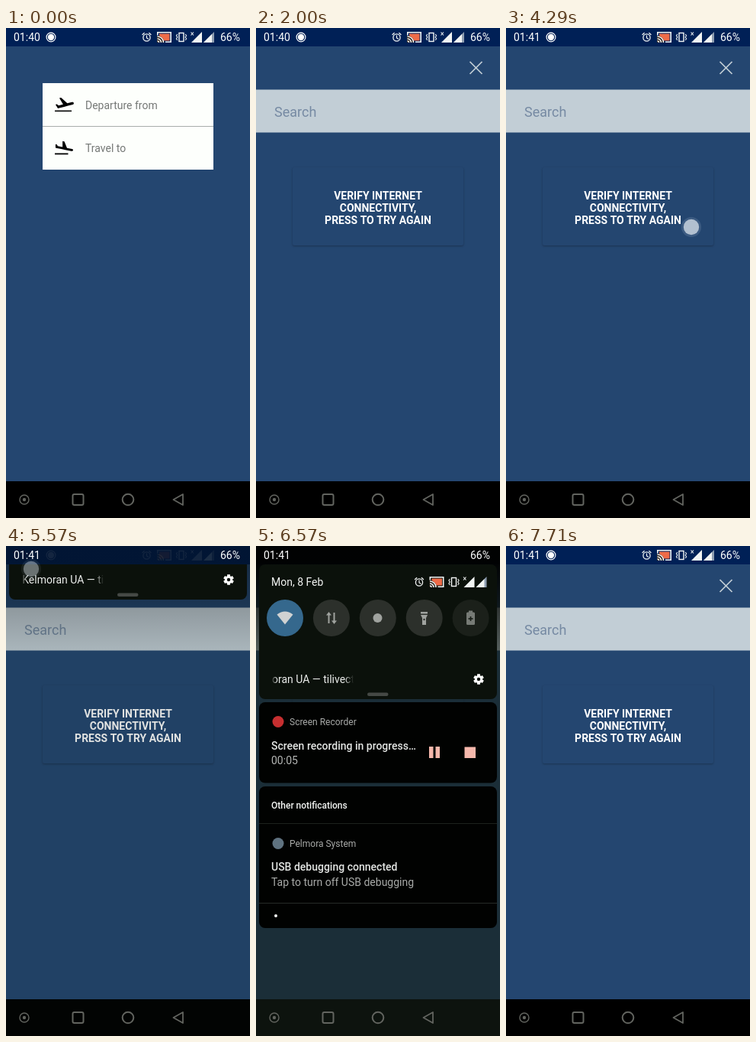
An HTML page with a canvas that plays this animation: 320x640 px, repeating every 8000 ms.

```html
<!DOCTYPE html>
<html lang="en">
<head>
<meta charset="utf-8">
<title>Travel search</title>
<style>
html, body { margin: 0; width: 100%; height: 100%; overflow: hidden; background: #000; }
canvas { display: block; width: 100%; height: 100%; }
</style>
</head>
<body>
<canvas id="stage" width="320" height="640"></canvas>
<script>
const ctx = document.getElementById('stage').getContext('2d');
const LOOP = 8000, RATE = 7;
const BLUE = '#244670', PANEL = '#0b110b';
const FULL = 499, QS_BOTTOM = 200;

const clamp = (v, a = 0, b = 1) => Math.min(b, Math.max(a, v));
const lerp = (a, b, k) => a + (b - a) * k;
const ease = k => k * k * (3 - 2 * k);
const mix = (a, b, k) => `rgb(${a.map((v, n) => Math.round(lerp(v, b[n], k)))})`;

// Piecewise linear value from [position, value] pairs
function track(keys, p) {
  if (p <= keys[0][0]) return keys[0][1];
  for (let n = 1; n < keys.length; n++) {
    const [a, va] = keys[n - 1], [b, vb] = keys[n];
    if (p <= b) return lerp(va, vb, (p - a) / (b - a));
  }
  return keys[keys.length - 1][1];
}

function rect(x, y, w, h, color) {
  ctx.fillStyle = color;
  ctx.fillRect(x, y, w, h);
}
function round(x, y, w, h, r, color) {
  ctx.fillStyle = color;
  ctx.beginPath();
  ctx.roundRect(x, y, w, h, r);
  ctx.fill();
}
function disc(x, y, r, color) {
  ctx.fillStyle = color;
  ctx.beginPath();
  ctx.arc(x, y, r, 0, 7);
  ctx.fill();
}
function ring(x, y, r, color, width) {
  ctx.strokeStyle = color;
  ctx.lineWidth = width;
  ctx.beginPath();
  ctx.arc(x, y, r, 0, 7);
  ctx.stroke();
}
function trace(points) {
  ctx.beginPath();
  for (let n = 0; n < points.length; n += 2) ctx.lineTo(points[n], points[n + 1]);
}
function poly(points, color) {
  trace(points);
  ctx.closePath();
  ctx.fillStyle = color;
  ctx.fill();
}
function line(points, color, width) {
  trace(points);
  ctx.strokeStyle = color;
  ctx.lineWidth = width;
  ctx.stroke();
}
function text(str, x, y, size, color, weight = 400, align = 'left') {
  ctx.font = `${weight} ${size}px Roboto, sans-serif`;
  ctx.textAlign = align;
  ctx.fillStyle = color;
  ctx.fillText(str, x, y);
}
function scoped(draw, alpha = 1, dx = 0, dy = 0) {
  if (alpha <= 0) return;
  ctx.save();
  ctx.globalAlpha *= alpha;
  ctx.translate(dx, dy);
  draw();
  ctx.restore();
}
function clip(x, y, w, h) {
  ctx.beginPath();
  ctx.rect(x, y, w, h);
  ctx.clip();
}

const TAKEOFF = new Path2D('M22.07 9.64c-.21-.8-1.04-1.28-1.84-1.06L14.92 10l-6.9-6.43-1.93.51 4.14 7.17-4.97 1.33-1.97-1.54-1.45.39 1.82 3.16.77 1.33 1.6-.43 5.31-1.42 4.35-1.16L21 11.49c.81-.23 1.28-1.05 1.07-1.85z');
const LANDING = new Path2D('M9.68 13.27l4.35 1.16 5.31 1.42c.8.21 1.62-.26 1.84-1.06.21-.8-.26-1.62-1.06-1.84l-5.31-1.42-2.76-9.02L10.12 2v8.28L5.15 8.95l-.93-2.32-1.45-.39v5.17l1.6.43 5.31 1.43z');

function plane(path, x, y, sx, sy) {
  ctx.save();
  ctx.translate(x, y);
  ctx.scale(sx, sy);
  ctx.fillStyle = '#000';
  ctx.fill(path);
  ctx.restore();
}

function statusIcons() {
  const c = '#f2f4f4';
  ring(184.5, 12.5, 4.6, c, 1.3);
  line([184.5, 9.5, 184.5, 13, 187, 14.5], c, 1.2);
  line([178.6, 9, 181.6, 6.3], c, 1.3);
  line([187.4, 6.3, 190.4, 9], c, 1.3);

  rect(201, 7.5, 13.5, 9, '#ee6b48');
  line([198.8, 9.5, 198.8, 5.8, 216.2, 5.8, 216.2, 18.2, 209, 18.2], c, 1.6);
  poly([198, 10, 202, 10.5, 206, 14, 208, 19, 198, 19], '#33281f');
  for (const r of [2, 5, 8]) {
    ctx.beginPath();
    ctx.arc(198.5, 19, r, -Math.PI / 2, 0);
    ctx.strokeStyle = c;
    ctx.lineWidth = 1.5;
    ctx.stroke();
  }

  ctx.strokeStyle = c;
  ctx.lineWidth = 1.4;
  ctx.strokeRect(227, 6.5, 6, 11);
  line([224.8, 8, 223.4, 10, 224.8, 12, 223.4, 14, 224.8, 16], c, 1.1);
  line([235.2, 8, 236.6, 10, 235.2, 12, 236.6, 14, 235.2, 16], c, 1.1);

  poly([257, 5, 257, 19, 243, 19], c);
  line([242.5, 5.5, 246, 9.5], c, 1.1);
  line([246, 5.5, 242.5, 9.5], c, 1.1);
  poly([273, 5, 273, 19, 259, 19], '#8d9cb0');
  poly([270, 8, 270, 19, 259, 19], c);
}

function navIcons() {
  const c = '#62645f';
  ring(24, 616, 6, c, 1.4);
  disc(24, 616, 2.2, c);
  ctx.strokeStyle = c;
  ctx.lineWidth = 2;
  ctx.beginPath();
  ctx.roundRect(87.5, 609, 14, 14, 2);
  ctx.stroke();
  ring(160, 616, 7.3, c, 2);
  ctx.lineJoin = 'round';
  line([232, 609, 232, 623, 219.5, 616, 232, 609, 232, 612], c, 1.8);
  ctx.lineJoin = 'miter';
}

function formPage(fade) {
  scoped(() => {
    rect(48, 129, 224, 56, '#fdfffc');
    plane(LANDING, 61.5, 146, 1.25, 0.93);
    rect(64, 163.5, 17.5, 1.8, '#000');
    text('Travel to', 104, 162, 14, '#757876');
    rect(48, 128, 224, 1, '#a9aeac');
  }, fade);
}

function searchBar(open) {
  const x = lerp(48, 0, open);
  rect(x, lerp(72, 80.5, open), 320 - 2 * x, 56, mix([253, 255, 252], [194, 206, 214], open));
  scoped(() => {
    plane(TAKEOFF, 62.8, 87, 1.18, 1.13);
    rect(64, 107.6, 22, 1.6, '#000');
    text('Departure from', 104, 105.5, 14, '#757876');
  }, 1 - 2 * open);
  scoped(() => {
    text('Search', 24, 115.5, 18, '#768aa3');
    line([280.5, 44, 296.5, 60], '#c3ced6', 1.7);
    line([296.5, 44, 280.5, 60], '#c3ced6', 1.7);
  }, 2 * open - 1);
}

function retryButton() {
  ctx.shadowColor = 'rgba(0,0,0,.28)';
  ctx.shadowBlur = 2.5;
  ctx.shadowOffsetY = 1;
  round(48, 182, 224, 102, 2, BLUE);
  ctx.shadowColor = 'transparent';
  ['VERIFY INTERNET', 'CONNECTIVITY,', 'PRESS TO TRY AGAIN'].forEach((s, n) =>
    text(s, 160, 223.6 + n * 16.3, 14, '#fff', 700, 'center'));
}

function wifi(x, y, color) {
  ctx.fillStyle = color;
  ctx.beginPath();
  ctx.moveTo(x, y + 8.5);
  ctx.lineTo(x - 10.5, y - 4.5);
  ctx.quadraticCurveTo(x, y - 12.5, x + 10.5, y - 4.5);
  ctx.fill();
}

function arrow(x, y, dir, color) {
  line([x, y - 7 * dir, x, y + 4 * dir], color, 2);
  poly([x - 3.5, y + 3.5 * dir, x + 3.5, y + 3.5 * dir, x, y + 8 * dir], color);
}

function gear(x, y) {
  for (let n = 0; n < 6; n++) {
    const a = n * Math.PI / 3 + Math.PI / 6;
    line([x, y, x + 6.8 * Math.cos(a), y + 6.8 * Math.sin(a)], '#fff', 3.8);
  }
  disc(x, y, 5.2, '#fff');
  disc(x, y, 2.2, PANEL);
}

function carrier(ms) {
  const first = 'Kelmoran ';
  const anchor = 75 - 0.032 * (ms - 5860);
  ctx.save();
  clip(20, 160, 108, 26);
  ctx.font = '400 14px Roboto, sans-serif';
  text(first + 'UA — tilivect', anchor - ctx.measureText(first).width, 179, 14, '#eceeec');
  for (const [edge, inner] of [[20, 28], [128, 116]]) {
    const g = ctx.createLinearGradient(edge, 0, inner, 0);
    g.addColorStop(0, PANEL);
    g.addColorStop(1, 'rgba(11,17,11,0)');
    rect(Math.min(edge, inner), 160, Math.abs(edge - inner), 26, g);
  }
  ctx.restore();
}

function quickSettings(on, ms) {
  round(4, 24, 312, QS_BOTTOM - 24, 8, PANEL);
  text('Mon, 8 Feb', 20, 52, 14, '#f2f4f2');
  scoped(statusIcons, 1, 29.5, 35);
  const g = '#a0a39f', y = 94;
  for (let n = 0; n < 5; n++) {
    const off = n === 4 ? '#1b201a' : '#2c302b';
    disc(38 + n * 60.9, y, 24, n ? off : mix([44, 48, 43], [61, 160, 238], on));
  }
  wifi(38, y, mix([165, 168, 164], [250, 252, 255], on));
  arrow(95.5, y, -1, g);
  arrow(102.5, y, 1, g);
  disc(159.5, y, 6, g);
  rect(216, 86, 9, 2.5, g);
  poly([216, 90, 225, 90, 223, 94, 223, 103, 218, 103, 218, 94], g);
  disc(220.5, 96, 1.2, '#2c302b');
  round(276, 86.5, 11, 16.5, 1.5, '#777b76');
  rect(279, 84.5, 5, 3, '#777b76');
  line([278.5, 95, 284.5, 95], '#1b201a', 1.7);
  line([281.5, 92, 281.5, 98], '#1b201a', 1.7);
  carrier(ms);
  gear(292, 174);
  round(146, 191.5, 27.5, 4.5, 2.2, '#454945');
}

const appIcon = (x, y, r = 7.5) => disc(x, y, r, '#c62f30');
const systemIcon = (x, y, r = 7.5) => disc(x, y, r, '#5f7280');

function cards() {
  round(4, 204, 312, 105.5, 8, '#010201');
  appIcon(29, 229.5);
  text('Screen Recorder', 44, 234, 12, '#a9aba9');
  text('Screen recording in progress…', 20, 266, 14, '#e4e6e4', 500);
  text('00:05', 20, 285, 14, '#b4b6b4');
  for (const x of [227, 235.5]) rect(x, 262, 5.5, 15, '#f6b8ac');
  rect(273.5, 262.5, 14.5, 14.5, '#f6b8ac');

  round(4, 314, 312, FULL - 314, 8, '#010201');
  text('Other notifications', 20, 343, 12, '#f4f6f4', 500);
  rect(4, 362, 312, 1, '#1d211d');
  systemIcon(29, 388.5);
  text('Pelmora System', 44, 393, 12, '#a9aba9');
  text('USB debugging connected', 20, 424, 14, '#e4e6e4', 500);
  text('Tap to turn off USB debugging', 20, 443.5, 14, '#a9aba9');
}

function notifications(bottom) {
  const top = Math.max(204, bottom - 33);
  const merged = top > 204;
  ctx.save();
  clip(0, 204, 320, top - 204);
  cards();
  ctx.restore();
  if (merged) rect(4, top, 312, 1, '#262b28');
  const y = merged ? top + 1 : top;
  ctx.save();
  clip(0, y, 320, bottom - y);
  round(4, y, 312, bottom - y, merged ? [0, 0, 8, 8] : 8, '#010201');
  if (!merged) {
    appIcon(28, 219.5, 6.5);
    systemIcon(48.5, 219.5, 6.5);
    disc(69.5, 219.5, 2, '#f0f2f0');
  } else if (top < 380) {
    systemIcon(39, top + 16.5, 7);
    disc(60, top + 16.5, 2, '#f0f2f0');
  } else {
    disc(26, top + 17, 2, '#f0f2f0');
  }
  ctx.restore();
}

const PULL = [[38, 0], [39, 70], [40, 180], [41, 286], [42, 410], [43, FULL], [48, FULL],
  [49, 390], [50, 236], [51, 150], [52, 75], [53, 24], [54, 0]];
const SCRIM = [[0, 0], [236, 0.43], [286, 0.55], [FULL, 0.62]];

function shade(bottom, on, ms) {
  rect(0, 0, 320, 640, `rgba(22,31,24,${track(SCRIM, bottom)})`);
  const k = clamp(bottom / 200);
  const g = ctx.createLinearGradient(0, 20, 0, 140);
  g.addColorStop(0, `rgba(0,0,0,${0.95 * k})`);
  g.addColorStop(1, 'rgba(0,0,0,0)');
  rect(0, 0, 320, 140, g);
  ctx.save();
  clip(0, 24, 320, 616);
  scoped(() => quickSettings(on, ms), 1, 0, Math.min(0, bottom - QS_BOTTOM));
  if (bottom > 206) notifications(bottom);
  ctx.restore();
}

// Touches: first tick, end tick, start x, y, end x, y, strength
const TOUCHES = [
  [1, 3, 150, 102, 150, 102, 0.75],
  [11, 14, 222, 237, 222, 237, 0.75],
  [16, 19, 240, 252, 240, 252, 0.75],
  [21, 23, 245, 262, 245, 262, 0.75],
  [25, 27, 244, 258, 244, 258, 0.75],
  [29, 31, 243, 260, 243, 260, 0.75],
  [32, 33, 248, 257, 248, 257, 0.75],
  [35, 37, 240, 246, 240, 246, 0.75],
  [39, 42, 33, 30, 33, 172.5, 0.42],
  [44, 46, 38, 96, 38, 96, 0.45],
  [48, 51, 248, 564, 254, 372, 0.6]
];

function touch(tick) {
  const hit = TOUCHES.find(([a, b]) => tick >= a && tick < b);
  if (!hit) return;
  const [a, b, x0, y0, x1, y1, alpha] = hit;
  const k = (tick - a) / (b - a);
  const x = lerp(x0, x1, k), y = lerp(y0, y1, k);
  scoped(() => {
    disc(x, y, 13, 'rgba(200,215,235,.2)');
    disc(x, y, 10.2, '#dae2ea');
  }, alpha);
}

function draw(ms) {
  const tick = Math.floor((ms + 5) * RATE / 1000);
  const open = ease(clamp((tick - 2) / 4));
  const pull = track(PULL, tick);

  rect(0, 0, 320, 640, BLUE);
  rect(0, 0, 320, 24, '#002056');
  rect(0, 592, 320, 48, '#000');
  formPage(1 - open);
  searchBar(open);
  scoped(retryButton, clamp((tick - 6) / 2));

  scoped(() => {
    ring(59, 12, 5.9, '#fff', 1.2);
    disc(59, 12, 4.2, '#fff');
    statusIcons();
  }, 1 - clamp(pull / 80));
  if (pull > 0) shade(pull, clamp((tick - 45) / 2), ms);
  text(tick < 25 ? '01:40' : '01:41', 10, 17, 14, '#fff');
  text('66%', 281, 17, 14, '#fff');
  navIcons();
  touch(tick);
}

function loop(now) {
  draw(now % LOOP);
  requestAnimationFrame(loop);
}
draw(0);
requestAnimationFrame(loop);
</script>
</body>
</html>
```
